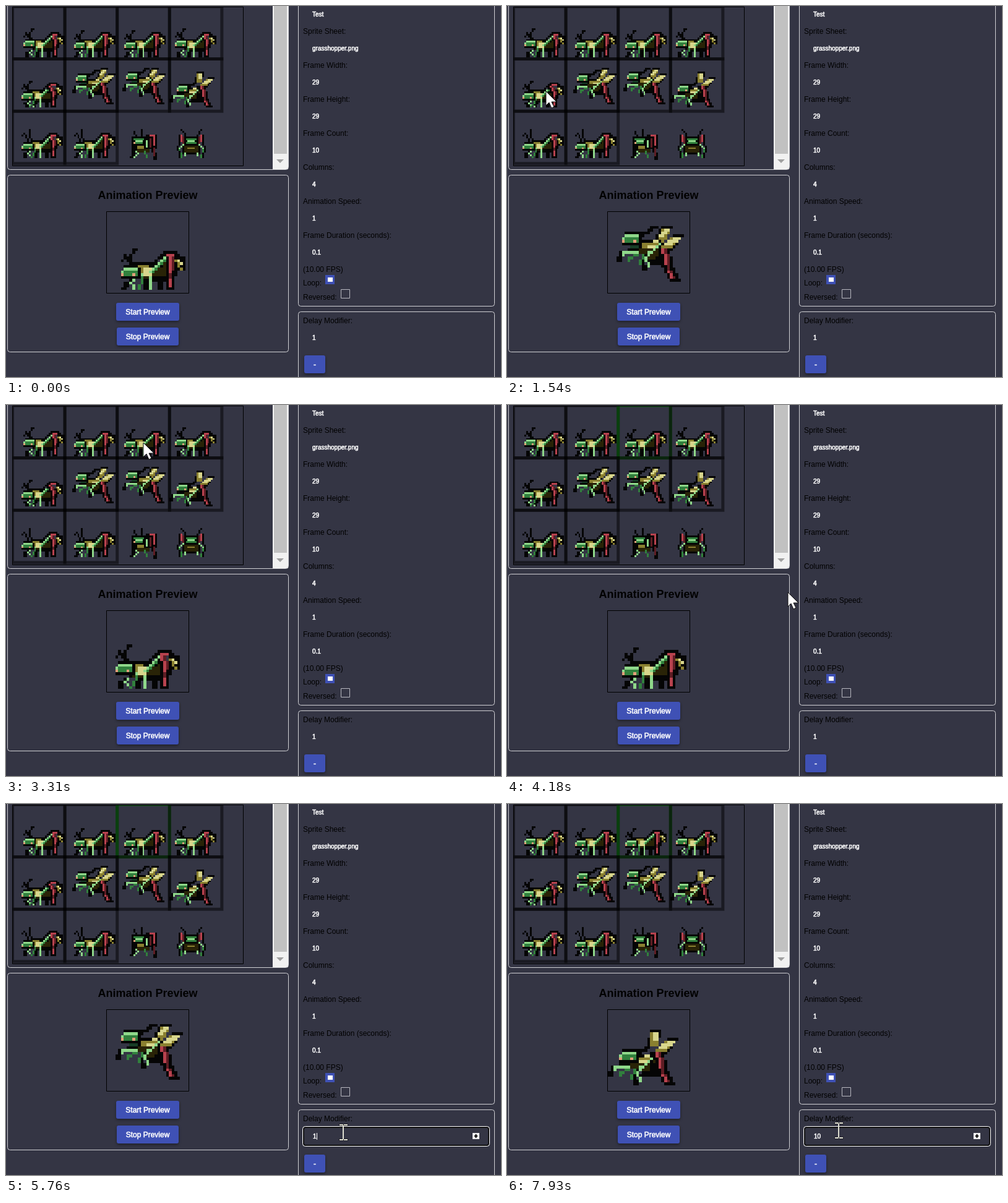
An HTML page with a canvas that plays this animation: 800 px wide and 600 px high, repeating every 8 s.

```html
<!DOCTYPE html>
<html lang="en">
<head>
<meta charset="utf-8">
<title>Sprite animation editor</title>
<style>
html, body { margin: 0; width: 100%; height: 100%; overflow: hidden; background: #343544; }
canvas { display: block; }
</style>
</head>
<body>
<canvas id="stage" width="800" height="600"></canvas>
<script>
const ctx = document.getElementById('stage').getContext('2d');
const LOOP = 8000, CELL = 29, SCALE = 2.917, SHEET_X = 10.5, SHEET_Y = 1;
const FONT = '"Liberation Sans", Arial, sans-serif';
const BG = '#343544', BLUE = '#3f51b5', EDGE = '#d0d0d4';
const BLACK = '#050505', DARK = '#292307', GREEN = '#31803d', LIGHT = '#8fd88a', MOSS = '#173d26',
      PALE = '#d8d68c', OLIVE = '#8a8030', RED = '#b8424e', WINE = '#5e1d24', PINK = '#e0a078';

/* ---- sprite sheet, drawn in whole pixels ---- */
const sheet = document.createElement('canvas');
sheet.width = 128;
sheet.height = 88;
const pen = sheet.getContext('2d');

function box(color, x, y, w, h) {
  pen.fillStyle = color;
  pen.fillRect(Math.round(x), Math.round(y), w, h);
}

function line(color, pts, size = 1) {
  for (let i = 0; i + 3 < pts.length; i += 2) {
    const [x, y, x2, y2] = pts.slice(i, i + 4);
    const n = Math.max(Math.abs(x2 - x), Math.abs(y2 - y), 1);
    for (let k = 0; k <= n; k++) box(color, x + (x2 - x) * k / n, y + (y2 - y) * k / n, size, 1);
  }
}

function shifted(dx, dy, draw) {
  pen.save();
  pen.translate(Math.round(dx), Math.round(dy));
  draw();
  pen.restore();
}

function head() {
  box(BLACK, 0, -1, 5, 1);
  box(BLACK, 5, 0, 1, 4);
  box(BLACK, -1, 2, 6, 2);
  box(LIGHT, 0, 0, 5, 1);
  box(GREEN, -1, 1, 6, 2);
  box(LIGHT, -1, 1, 1, 2);
  box(PINK, -1, 2, 1, 1);
  box(PINK, 3, 2, 1, 1);
}

function antennae(upright) {
  if (upright) {
    line(BLACK, [9, 12, 9, 15, 10, 18]);
    line(BLACK, [5, 15, 6, 14, 7, 15, 8, 18]);
  } else {
    line(BLACK, [10, 13, 9, 13, 8, 15, 8, 17, 10, 19]);
    line(BLACK, [5, 17, 6, 15, 7, 17, 9, 19]);
  }
}

function walker(x, y, lift, stride, upright) {
  shifted(x, y + lift, () => antennae(upright));
  shifted(x, y, () => {
    // back outline and abdomen
    line(BLACK, [10, 18, 16, 18, 20, 14, 24, 14, 26, 16]);
    box(BLACK, 15, 18, 10, 5);
    line(BLACK, [18, 16, 20, 15, 23, 15], 3);
    box(BLACK, 24, 16, 4, 5);
    box(BLACK, 14, 23, 7, 2);
    box(DARK, 16, 20, 5, 3);
    box(DARK, 20, 17, 2, 4);
    // far legs
    line(BLACK, [8, 24, 6, 25, 5 + stride, 27], 2);
    line(BLACK, [12, 23, 13 - stride, 27], 2);
    line(BLACK, [18, 23, 18, 27], 2);
    // thorax
    box(BLACK, 10, 19, 1, 5);
    box(OLIVE, 11, 19, 4, 3);
    box(PALE, 13, 20, 3, 3);
    box(LIGHT, 10, 22, 3, 1);
    box(DARK, 11, 23, 4, 1);
  });
  shifted(x + 6, y + lift + 20, head);
  shifted(x, y, () => {
    // near legs
    line(LIGHT, [9, 24, 8, 25, 9 + stride, 27]);
    line(GREEN, [12, 23, 11 - stride, 27]);
    line(LIGHT, [15, 23, 15, 27]);
    // hind leg and wing tip
    line(LIGHT, [15, 21, 20, 16]);
    line(GREEN, [16, 21, 20, 17]);
    line(BLACK, [21 - stride, 17, 21, 20, 21, 27], 3);
    box(RED, 21, 15, 3, 1);
    line(RED, [22 - stride, 16, 22, 20, 22, 26]);
    line(WINE, [23 - stride, 16, 23, 20]);
    box(WINE, 22, 22, 1, 2);
    line(OLIVE, [24, 17, 26, 20]);
    line(PALE, [25, 17, 26, 18]);
  });
}

function flyer(dx, dy, tilt, lean) {
  const headX = 6 + dx + tilt / 5, headY = 8 + dy + tilt;
  shifted(headX, headY, () => {
    line(BLACK, [4, -1, 6, -1, 8, -2], 1);
    line(BLACK, [5, 0, 8, -1, 9, -3, 11, -3], 1);
  });
  // abdomen and wings
  shifted(dx, dy, () => {
    line(BLACK, [12, 14 + tilt, 17, 13], 5);
    line(BLACK, [13, 16 + tilt, 18, 16], 4);
    box(BLACK, 14, 11 + tilt / 2, 7, 8);
    line(DARK, [14, 16 + tilt / 2, 18, 13], 3);
    line(BLACK, [16, 10, 17 + lean, 5], 4);
    line(OLIVE, [17, 10, 17 + lean, 6], 3);
    line(PALE, [18, 8, 18 + lean, 6], 2);
    line(BLACK, [18, 14, 23, 8], 4);
    line(OLIVE, [18, 13, 22, 9], 4);
    line(PALE, [20, 11, 23, 9], 3);
  });
  // thorax and front legs
  shifted(dx - tilt / 5, dy + tilt * .7, () => {
    line(BLACK, [10, 10, 17, 10], 2);
    box(BLACK, 8, 11, 11, 4);
    box(OLIVE, 12, 11, 6, 2);
    box(PALE, 14, 12, 3, 1);
    box(PALE, 16, 10, 2, 1);
    box(DARK, 11, 13, 7, 2);
    box(MOSS, 8, 12, 3, 2);
    line(BLACK, [9, 13, 4, 14, 3, 17], 2);
    line(LIGHT, [10, 14, 5, 14, 5, 15]);
    line(GREEN, [10, 15, 7, 16, 7, 17]);
    line(BLACK, [13, 15, 11, 18, 12, 20], 2);
    line(GREEN, [12, 15, 11, 18]);
    line(LIGHT, [14, 14, 13, 17, 14, 19]);
    line(LIGHT, [15, 14, 18, 11]);
  });
  shifted(headX, headY, head);
  // hind leg
  shifted(dx, dy, () => {
    line(BLACK, [18, 13, 19, 18, 20, 21, 22, 24], 4);
    line(RED, [19, 13, 20, 17, 21, 21], 1);
    line(WINE, [20, 13, 21, 17, 21, 20, 23, 23]);
    box(RED, 22, 22, 1, 2);
  });
}

function threeQuarter() {
  line(BLACK, [9, 11, 10, 15]);
  line(BLACK, [13, 10, 13, 15]);
  box(BLACK, 8, 14, 10, 9);
  box(BLACK, 16, 13, 6, 8);
  box(GREEN, 9, 15, 6, 1);
  box(LIGHT, 10, 16, 4, 1);
  box(GREEN, 10, 17, 4, 1);
  box(PINK, 9, 17, 1, 1);
  box(OLIVE, 11, 19, 4, 2);
  box(DARK, 10, 21, 8, 2);
  box(RED, 18, 13, 3, 1);
  line(RED, [20, 14, 20, 18]);
  line(WINE, [18, 15, 18, 19]);
  line(LIGHT, [16, 16, 16, 19]);
  line(GREEN, [15, 22, 16, 25]);
  line(BLACK, [9, 21, 7, 25], 2);
  line(LIGHT, [10, 22, 11, 23, 9, 25]);
  line(BLACK, [19, 20, 20, 26], 2);
  line(WINE, [20, 20, 20, 24]);
}

function front() {
  line(BLACK, [6, 10, 9, 14]);
  line(BLACK, [17, 10, 14, 14]);
  box(BLACK, 7, 14, 10, 10);
  box(GREEN, 9, 15, 6, 1);
  box(LIGHT, 10, 16, 4, 1);
  box(GREEN, 9, 17, 6, 1);
  box(DARK, 8, 19, 8, 4);
  box(OLIVE, 10, 20, 4, 1);
  for (const side of [-1, 1]) {
    const at = (color, pts) => line(color, pts.map((v, i) => i % 2 ? v : 11.5 + side * v));
    at(BLACK, [6.5, 13, 6.5, 18]);
    at(RED, [5.5, 13, 5.5, 16]);
    at(WINE, [4.5, 14, 4.5, 17]);
    at(LIGHT, [4.5, 18, 6.5, 20]);
    at(GREEN, [6.5, 21, 5.5, 25]);
    at(BLACK, [7.5, 19, 6.5, 25]);
    at(LIGHT, [3.5, 23, 3.5, 24]);
  }
}

const poses = [
  () => walker(1, 0, -1, 1),
  () => walker(0, 0, 0, 0),
  () => walker(-1, 0, 0, 0),
  () => walker(-2, 0, -1, 1),
  () => walker(0, -1, 0, 2),
  () => flyer(1, 0, 1, 2),
  () => flyer(0, 0, 0, 2),
  () => flyer(-2, 2, 5, 0),
  () => walker(0, -2, 0, 1, true),
  () => walker(0, -2, 0, 0, true),
  threeQuarter,
  front
];
poses.forEach((draw, i) => shifted(i % 4 * CELL, Math.floor(i / 4) * CELL, draw));

/* ---- timing ---- */
const STEP = 106, HOLD_START = 6440, HOLD_END = 7430;
const SELECT = 3500, FOCUS = 5250, TYPED = 6240, BLINK = 530;

function frameAt(t) {
  if (t < HOLD_START) return Math.min(61, Math.floor(1.85 + t / STEP)) % 10;
  if (t < HOLD_END) return 2;
  return (3 + Math.floor((t - HOLD_END) / STEP)) % 10;
}

const path = [
  [160, 356, 600], [850, 0, 425], [1200, 28, 290], [1500, 63, 138], [1700, 62, 138],
  [2000, 36, 110], [2290, 11, 91], [2400, 70, 62], [2490, 134, 58], [2750, 176, 40],
  [3120, 215, 60], [3310, 222, 61], [3900, 222, 61], [4250, 480, 330], [4500, 742, 512],
  [4680, 720, 522], [5000, 545, 531], [7350, 545, 531], [7600, 546, 529], [7930, 536, 528]
];

function pointerAt(t) {
  if (t < path[0][0]) return null;
  const i = path.findIndex(p => p[0] > t);
  if (i < 0) return path[path.length - 1].slice(1);
  const [t0, x0, y0] = path[i - 1], [t1, x1, y1] = path[i];
  let k = (t - t0) / (t1 - t0);
  k = k * k * (3 - 2 * k);
  return [x0 + (x1 - x0) * k, y0 + (y1 - y0) * k];
}

/* ---- page ---- */
function rect(color, x, y, w, h) {
  ctx.fillStyle = color;
  ctx.fillRect(x, y, w, h);
}

function frameBox(color, x, y, w, h, radius = 0, width = 1) {
  ctx.strokeStyle = color;
  ctx.lineWidth = width;
  ctx.beginPath();
  ctx.roundRect(x + width / 2, y + width / 2, w - width, h - width, radius);
  ctx.stroke();
}

function text(str, x, y, size = 12, color = '#000', weight = '', align = 'left') {
  ctx.font = `${weight} ${size}px ${FONT}`;
  ctx.textAlign = align;
  ctx.fillStyle = ctx.strokeStyle = color;
  ctx.fillText(str, x, y);
  if (color === '#fff') {
    ctx.lineWidth = .55;
    ctx.strokeText(str, x, y);
  }
}

function button(label, x, y, w) {
  ctx.save();
  ctx.shadowColor = 'rgba(0,0,0,.4)';
  ctx.shadowBlur = 4;
  ctx.shadowOffsetY = 2;
  ctx.fillStyle = BLUE;
  ctx.beginPath();
  ctx.roundRect(x, y, w, 29, 3);
  ctx.fill();
  ctx.restore();
  text(label, x + w / 2, y + 18.5, 12, '#fff', '', 'center');
}

function shape(fill, pts) {
  ctx.fillStyle = fill;
  ctx.beginPath();
  for (let i = 0; i < pts.length; i += 2) ctx.lineTo(pts[i], pts[i + 1]);
  ctx.closePath();
  ctx.fill();
}

function drawSheet(selected) {
  ctx.save();
  ctx.beginPath();
  ctx.rect(11, 2, 372, 256);
  ctx.clip();
  ctx.drawImage(sheet, SHEET_X, SHEET_Y, 128 * SCALE, 88 * SCALE);
  const size = CELL * SCALE;
  ctx.lineWidth = 5;
  for (let i = 0; i < 10; i++) {
    ctx.strokeStyle = selected && i === 2 ? 'rgba(0,90,0,.6)' : 'rgba(0,0,0,.5)';
    ctx.strokeRect(SHEET_X + i % 4 * size, SHEET_Y + Math.floor(i / 4) * size, size, size);
  }
  ctx.restore();
  frameBox('#000', 10, 1, 374, 258);
}

function drawLeft(t) {
  drawSheet(t >= SELECT);
  rect('#f1f1f1', 431, 0, 25, 264);
  rect('#c1c1c1', 433, 0, 21, 239);
  shape('#a0a0a0', [437, 248, 449, 248, 443, 254]);
  frameBox(EDGE, 2, -20, 455, 285, 4);
  frameBox(EDGE, 2, 273, 455, 287, 4);
  text('Animation Preview', 229, 312, 18, '#000', 'bold', 'center');
  frameBox('#000', 162, 332, 134, 133);
  const f = frameAt(t);
  ctx.drawImage(sheet, f % 4 * CELL, Math.floor(f / 4) * CELL, CELL, CELL, 163, 333, 132, 131);
  button('Start Preview', 178, 480, 102);
  button('Stop Preview', 179, 520, 100);
}

const fields = [
  ['', 'Test'], ['Sprite Sheet:', 'grasshopper.png'], ['Frame Width:', '29'], ['Frame Height:', '29'],
  ['Frame Count:', '10'], ['Columns:', '4'], ['Animation Speed:', '1'], ['Frame Duration (seconds):', '0.1']
];

function drawRight(t, hover) {
  frameBox(EDGE, 472, -20, 318, 506, 4);
  frameBox(EDGE, 472, 494, 318, 140, 4);
  fields.forEach(([label, value], i) => {
    text(label, 480, 55 * i - 10);
    text(value, 495, 55 * i + 17, 10, '#fff');
  });
  text('(10.00 FPS)', 480, 430);
  text('Loop:', 480, 452);
  rect(BLUE, 516, 435, 15, 15);
  rect('#fff', 520, 439, 8, 7);
  text('Reversed:', 480, 475);
  frameBox('#b8b8c0', 541, 458, 15, 15);
  text('Delay Modifier:', 480, 513);

  const focus = t >= FOCUS, shift = focus ? 1 : 0, typed = t >= TYPED;
  if (focus) {
    frameBox('#101010', 480, 522, 301, 31, 3, 2);
    frameBox('#fff', 479, 521, 303, 33, 4);
  }
  text(typed ? '10' : '1', 495 + shift, 540 + shift, 10, '#fff');
  const since = t - (typed ? TYPED : FOCUS);
  if (focus && Math.floor(since / BLINK) % 2 === 0) rect('#fff', typed ? 507 : 502, 532, 1, 11);
  if (hover || focus) {
    const x = 755 - shift, y = 531 + shift;
    rect('#f4f4f4', x, y, 11, 10);
    shape('#222', [x + 5.5, y + 1.5, x + 8.5, y + 5, x + 5.5, y + 8.5, x + 2.5, y + 5]);
  }
  button('-', 482, 565 + 2 * shift, 34);
}

function drawPointer(x, y, beam) {
  ctx.save();
  ctx.translate(Math.round(x), Math.round(y));
  if (beam) {
    rect('#22222c', -7, -14, 15, 4);
    rect('#22222c', -7, 10, 15, 4);
    for (const end of [-13, 11]) {
      rect('#deded0', -6, end, 6, 2);
      rect('#deded0', 1, end, 6, 2);
    }
    rect('#deded0', -1, -11, 2, 22);
  } else {
    shape('#fff', [0, 0, 0, 23, 5, 18, 9, 27, 13, 25, 9, 17, 17, 17]);
    ctx.strokeStyle = '#111';
    ctx.lineWidth = 1;
    ctx.stroke();
  }
  ctx.restore();
}

function render(now) {
  const t = now % LOOP, pointer = pointerAt(t);
  const beam = !!pointer && pointer[0] > 480 && pointer[1] > 518;
  ctx.imageSmoothingEnabled = false;
  rect(BG, 0, 0, 800, 600);
  drawLeft(t);
  drawRight(t, beam);
  if (pointer) drawPointer(...pointer, beam);
}

const start = performance.now();
function tick() {
  render(performance.now() - start);
  requestAnimationFrame(tick);
}
tick();
</script>
</body>
</html>
```
